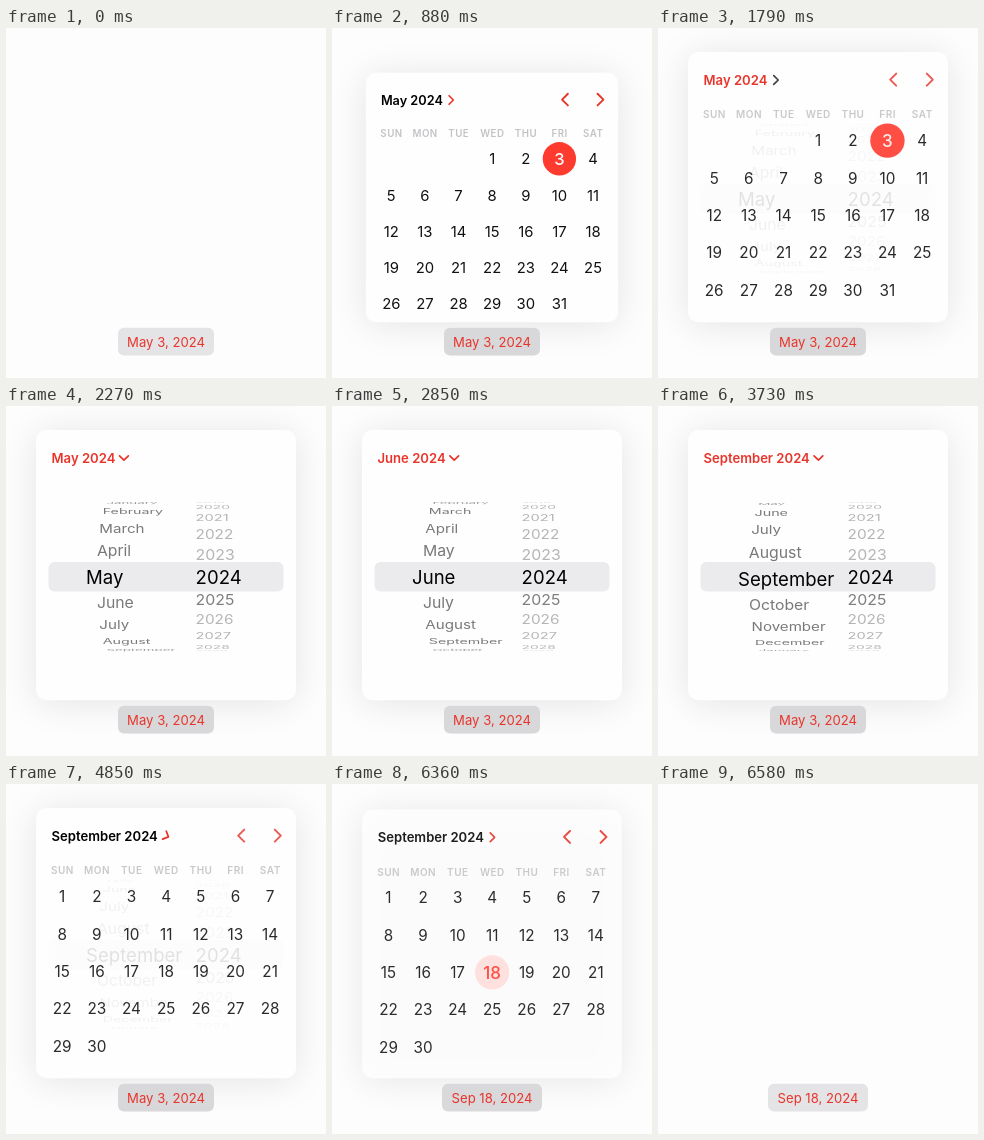
Recreate the animation shown at these times as an HTML page with a canvas. Size 320x350 px, loop 6.82 s.

```html
<!DOCTYPE html>
<html lang="en">
<head>
<meta charset="utf-8">
<title>Date picker</title>
<style>
  html, body { margin: 0; width: 100%; height: 100%; overflow: hidden; background: #fdfdfd; }
  canvas { display: block; width: 320px; height: 350px; }
</style>
</head>
<body>
<canvas></canvas>
<script>
const LOOP = 6820, RED = '#ff3b30', TITLE_RED = '#e8352b', BLACK = '#111';
const MONTHS = ['January', 'February', 'March', 'April', 'May', 'June', 'July',
  'August', 'September', 'October', 'November', 'December'];
const WEEKDAYS = ['SUN', 'MON', 'TUE', 'WED', 'THU', 'FRI', 'SAT'];
const BAND = { x: 42.5, y: 156, w: 235, h: 29.5 };
const WHEEL_Y = 170.8, RADIUS = 74.5;

const canvas = document.querySelector('canvas');
const ctx = canvas.getContext('2d');
const ratio = window.devicePixelRatio || 1;
canvas.width = 320 * ratio;
canvas.height = 350 * ratio;

const clamp = v => Math.min(1, Math.max(0, v));
const progress = (t, from, to) => clamp((t - from) / (to - from));
const easeOut = (u, power) => 1 - (1 - u) ** power;

// Run a drawing step with its own opacity, multiplied into the current one.
function group(alpha, draw) {
  ctx.save();
  ctx.globalAlpha *= alpha;
  draw();
  ctx.restore();
}

function text(str, x, y, size, color, weight = 400, align = 'center') {
  ctx.font = `${weight} ${size}px Inter, Roboto, sans-serif`;
  ctx.textAlign = align;
  ctx.fillStyle = color;
  ctx.fillText(str, x, y + size * 0.364);
}

function box(x, y, w, h, r, color) {
  ctx.beginPath();
  ctx.roundRect(x, y, w, h, r);
  ctx.fillStyle = color;
  ctx.fill();
}

function disc(x, y, r, color) {
  ctx.beginPath();
  ctx.arc(x, y, r, 0, Math.PI * 2);
  ctx.fillStyle = color;
  ctx.fill();
}

function chevron(x, y, size, angle, width, color) {
  ctx.save();
  ctx.translate(x, y);
  ctx.rotate(angle);
  ctx.beginPath();
  ctx.moveTo(-size / 2, -size);
  ctx.lineTo(size / 2, 0);
  ctx.lineTo(-size / 2, size);
  ctx.lineWidth = width;
  ctx.lineCap = ctx.lineJoin = 'round';
  ctx.strokeStyle = color;
  ctx.stroke();
  ctx.restore();
}

// Month wheel position: two flicks of two months each.
const monthAt = t => 4 + 2 * easeOut(progress(t, 2640, 3300), 1.8)
  + 2 * easeOut(progress(t, 3330, 3970), 3.3);

// How far the month wheels have replaced the day grid.
function pickerAt(t) {
  if (t < 1790) return 0;
  if (t < 4670) return progress(t, 1760, 2060);
  return (1 - progress(t, 4670, 5090)) ** 4;
}

function turnAt(t) {
  const u = t < 4670 ? easeOut(progress(t, 1790, 2060), 2)
    : (1 - progress(t, 4670, 5090)) ** 2.3;
  return u * Math.PI / 2;
}

function cardAt(t) {
  if (t < 760 || t >= 6580) return { alpha: 0 };
  if (t < 6360) {
    const x = (t - 760) * 0.028, rest = (1 + x) * Math.exp(-x);
    return { alpha: progress(t, 730, 820), scale: 1 - 0.2 * rest, height: 1 - 0.52 * rest };
  }
  const u = progress(t, 6333, 6580);
  return { alpha: 1 - u, scale: 1 - 0.2 * u * u, height: 1 - 0.4 * u * u };
}

function drawColumn(col, zoom) {
  const base = Math.round(col.pos);
  for (let i = base - 5; i <= base + 5; i++) {
    const angle = (i - col.pos) * col.step * Math.PI / 180;
    const squash = Math.cos(angle);
    if (squash <= 0.02) continue;
    const scale = zoom / (1 + RADIUS * (1 - squash) / 310);
    ctx.save();
    ctx.translate(col.center - col.reach * scale, WHEEL_Y + RADIUS * Math.sin(angle) * zoom);
    ctx.scale(scale, scale * squash);
    group(zoom > 1 ? 1 : col.alpha(i - col.pos), () =>
      text(col.label(i), 0, 0, 16, '#000', 400, 'left'));
    ctx.restore();
  }
}

function drawWheels(pos) {
  const columns = [{
    pos, step: 20.2, center: 152, reach: 62,
    label: i => MONTHS[(i + 12) % 12],
    alpha: d => Math.abs(d) > 3.5 ? 0.38 : 0.53
  }, {
    pos: 2024, step: 17.5, center: 189.6, reach: 0,
    label: String,
    alpha: d => d === 1 ? 0.5 : 0.29
  }];
  box(BAND.x, BAND.y, BAND.w, BAND.h, 6, '#ebebed');
  const bottom = BAND.y + BAND.h;
  const layer = (zoom, ...spans) => group(1, () => {
    ctx.beginPath();
    for (const [top, end] of spans) ctx.rect(30, top, 260, end - top);
    ctx.clip();
    columns.forEach(col => drawColumn(col, zoom));
  });
  layer(1, [95, BAND.y], [bottom, 246]);
  layer(1.16, [BAND.y, bottom]);
}

function drawDays(month, selected, today) {
  const colX = c => 56.2 + 34.65 * c;
  WEEKDAYS.forEach((name, c) => {
    ctx.letterSpacing = '0.5px';
    text(name, colX(c) + 0.2, 86.8, 10, '#c3c3c6', 600);
    ctx.letterSpacing = '0px';
  });
  const first = new Date(2024, month, 1).getDay();
  const count = new Date(2024, month + 1, 0).getDate();
  for (let day = 1; day <= count; day++) {
    const cell = first + day - 1;
    const x = colX(cell % 7), y = 112.6 + 37.4 * Math.floor(cell / 7);
    if (day === selected) {
      disc(x, y, 17.2, today ? RED : '#ffdedc');
      text(day, x, y, 17, today ? '#fff' : RED, 500);
    } else {
      text(day, x, y, 15.3, BLACK);
    }
  }
}

function drawCard(t) {
  const { alpha, scale, height } = cardAt(t);
  if (!alpha) return;
  const left = 160 - 130 * scale, top = 294.3 - 270.3 * height;
  const pos = monthAt(t), month = Math.round(pos), picker = pickerAt(t);
  group(alpha, () => {
    ctx.shadowColor = 'rgba(0,0,0,.1)';
    ctx.shadowBlur = 36 * ratio;
    ctx.shadowOffsetY = 3 * ratio;
    box(left, top, 260 * scale, 270.3 * height, 10, '#fefefe');
    ctx.shadowColor = 'transparent';
    ctx.clip();
    ctx.translate(left, top);
    ctx.scale(scale, scale);
    ctx.translate(-30, -24);

    const title = MONTHS[month] + ' 2024';
    const active = t >= 1790 && t < 4670;
    text(title, 45.5, 52, 13.1, active ? TITLE_RED : '#000', 600, 'left');
    const titleEnd = 45.5 + ctx.measureText(title).width;
    chevron(titleEnd + 8.6, 52, 4.4, turnAt(t), 1.7, t >= 1790 && t < 1850 ? '#444' : TITLE_RED);

    if (picker > 0) group(picker, () => drawWheels(pos));
    if (picker < 1) group(1 - picker, () => {
      drawDays(month, month === 4 ? 3 : t >= 5450 ? 18 : 0, month === 4);
      ctx.globalAlpha *= 1 - picker;
      chevron(235.2, 51.6, 6, Math.PI, 2, TITLE_RED);
      chevron(271.8, 51.6, 6, 0, 2, TITLE_RED);
    });
  });
}

function drawButton(t) {
  const late = t >= 5450, half = late ? 50 : 48;
  const shade = cardAt(t).alpha;
  const rgb = [228, 228, 230].map(v => Math.round(v - 12 * shade));
  box(160 - half, 299.8, half * 2, 27.8, 6, `rgb(${rgb})`);
  text(late ? 'Sep 18, 2024' : 'May 3, 2024', 160, 313.8, 13.1, TITLE_RED);
}

function frame(now) {
  const t = now % LOOP;
  ctx.setTransform(ratio, 0, 0, ratio, 0, 0);
  ctx.fillStyle = '#fdfdfd';
  ctx.fillRect(0, 0, 320, 350);
  drawCard(t);
  drawButton(t);
  requestAnimationFrame(frame);
}

requestAnimationFrame(frame);
</script>
</body>
</html>
```
